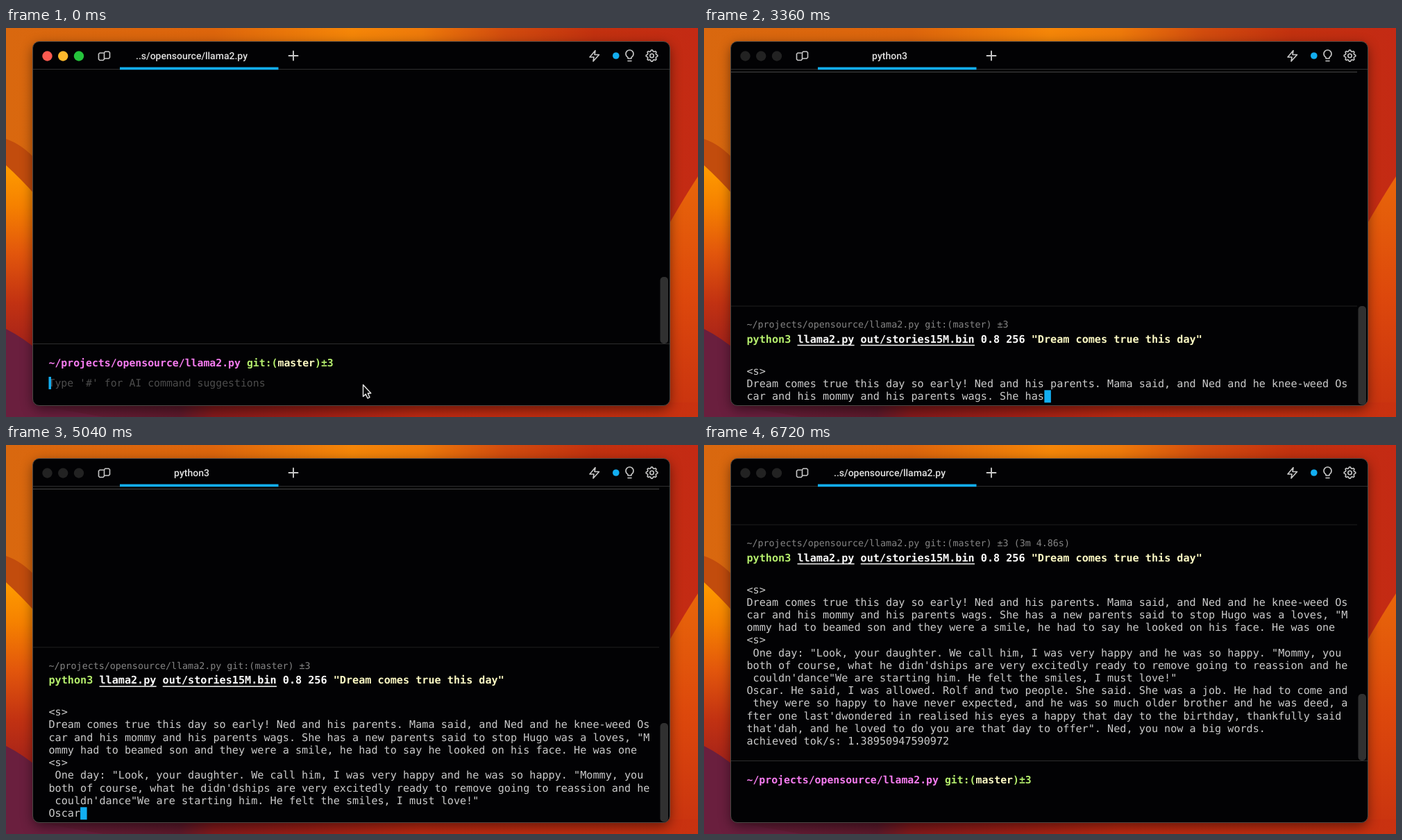
Animation of 997 by 561 pixels, one loop 6.96 s. Source, as an HTML page:

```html
<!DOCTYPE html>
<html lang="en">
<head>
<meta charset="utf-8">
<title>Terminal story</title>
<style>
  html, body { margin: 0; width: 100%; height: 100%; overflow: hidden; background: #000; }
  svg { display: block; width: 100%; height: 100%; }
  text { white-space: pre; text-rendering: geometricPrecision; }
  #screen text { font-family: "DejaVu Sans Mono", monospace; }
  #tab { font: 500 14px Roboto, sans-serif; fill: #e2e2e2; text-anchor: middle; }
  .icon { fill: none; stroke: #c9c9c9; stroke-width: 1.6; stroke-linejoin: round; stroke-linecap: round; }
</style>
</head>
<body>
<svg viewBox="0 0 997 561">
  <defs>
    <linearGradient id="sky">
      <stop offset="0" stop-color="#d9680f"/>
      <stop offset=".3" stop-color="#dd650c"/>
      <stop offset=".5" stop-color="#f58608"/>
      <stop offset=".6" stop-color="#ee7a0a"/>
      <stop offset=".72" stop-color="#d24c0e"/>
      <stop offset=".85" stop-color="#c2310f"/>
      <stop offset="1" stop-color="#c42a14"/>
    </linearGradient>
    <linearGradient id="petal" x2="0" y2="1">
      <stop offset="0" stop-color="#ff9c00"/>
      <stop offset=".2" stop-color="#f68200"/>
      <stop offset=".45" stop-color="#e2560c"/>
      <stop offset=".7" stop-color="#c23212"/>
      <stop offset="1" stop-color="#9c1e1c"/>
    </linearGradient>
    <linearGradient id="flame" x2="0" y2="1">
      <stop offset="0" stop-color="#e8660a"/>
      <stop offset=".5" stop-color="#dd480c"/>
      <stop offset="1" stop-color="#c83210"/>
    </linearGradient>
    <linearGradient id="floor">
      <stop offset="0" stop-color="#6a1f3e"/>
      <stop offset=".25" stop-color="#5e1a2c"/>
      <stop offset=".3" stop-color="#861a1c"/>
      <stop offset=".45" stop-color="#a32016"/>
      <stop offset=".6" stop-color="#c02a12"/>
      <stop offset="1" stop-color="#c93210"/>
    </linearGradient>
    <filter id="shade" x="-10%" y="-10%" width="120%" height="120%">
      <feGaussianBlur stdDeviation="9"/>
    </filter>
  </defs>

  <rect width="997" height="561" fill="url(#sky)"/>
  <path d="M0 160Q24 168 45 192V260H0Z" fill="#c24c0d"/>
  <path d="M0 198Q22 218 45 244V480H0Z" fill="url(#petal)"/>
  <path d="M0 470H45V561H0Z" fill="#9c1e1c"/>
  <path d="M997 214Q976 246 950 292V561H997Z" fill="url(#flame)"/>
  <path d="M0 540H997V561H0Z" fill="url(#floor)"/>
  <path d="M0 434Q24 446 50 468V545L140 561H0Z" fill="#6a1f3e"/>
  <rect x="39" y="25" width="917" height="525" rx="10" opacity=".5" filter="url(#shade)"/>
  <rect x="38.5" y="19.5" width="918" height="525" rx="9.5" fill="#020204" stroke="#4b4744"/>

  <path d="M39 59.5H956" stroke="#2f2f2f"/>
  <g id="lights">
    <circle cx="59.5" cy="40.5" r="7.2"/>
    <circle cx="82.2" cy="40.5" r="7.2"/>
    <circle cx="105" cy="40.5" r="7.2"/>
  </g>
  <g class="icon">
    <path d="M140 36H135L133.5 37.5V45L135 46.5H140L141.5 45V35.5L143 34H148L149.5 35.5V42.5L148 44H142"/>
    <path d="M407.5 40H420.5M414 33.5V46.5" stroke-width="1.9"/>
    <path d="M849 32.5L841 42H847L846 48L854.5 38.5H848Z"/>
    <path d="M896 44V42.3Q893 40.3 893 37.2a5.5 5.5 0 0 1 11 0Q904 40.3 901 42.3V44ZM896 47.5H901"/>
    <path id="gear"/>
    <circle cx="930.5" cy="40" r="2.7"/>
  </g>
  <circle cx="878.8" cy="40" r="4.8" fill="#12aef2"/>
  <text id="tab" x="267.5" y="45"></text>
  <rect x="164" y="56.5" width="228.5" height="3.7" fill="#12aef2"/>
  <g id="screen"></g>
</svg>

<script>
const LOOP = 6960, STEP = 80, LEFT = 61.5, COLS = 95;
const BODY = 15.157, PROMPT = 14.82, META = 13.34, ADVANCE = 0.602, LINE = 18.22;
const RUN = 2640, DONE = 6560;
const GREEN = '#b5ee6d', CREAM = '#fdfac4', BLUE = '#12aef2';

const command = 'python3 llama2.py out/stories15M.bin 0.8 256 "Dream comes true this day"';
const path = '~/projects/opensource/llama2.py';

// Bars split the story where the printing speed changes.
const story = `<s>
Dream comes true this day so early! Ned and his parents. Mama said, and Ned and he knee-weed Oscar and his mommy and his parents wags. She has| a new parents said to stop Hugo was a loves, "Mommy had to beamed son and they were a smile, he had to say he looked on his face. He was one
<s>
 One day: "Look, your daughter. We call him, I was very happy and he was so happy. "Mommy, you both of course, what he didn'd|ships are very excitedly ready to remove going to reassion and he couldn'dance"We are starting him. He felt the smiles, I must love!"
Oscar|. He said, I was allowed. Rolf and two people. She said. She was a job. He had to come and they were so happy to have never expected, and he was so much older brother and he was deed, after one last'dwondered in realised his eyes a happy that day to the birthday,| thankfully said that'dah, and he loved to do you are that day to offer". Ned, you now a big words.`;
const parts = story.split('|').map(s => s.match(/\s?[a-z]+|[^]/gi));
const marks = [2720, 3360, 4480, 5040, 6080, 6480];

const $ = id => document.getElementById(id);
const esc = s => s.replace(/&/g, '&amp;').replace(/</g, '&lt;');
const span = (s, fill) => `<tspan fill="${fill}">${esc(s)}</tspan>`;
const row = (y, size, inner, weight = 400) =>
  `<text x="${LEFT}" y="${y}" font-size="${size}" font-weight="${weight}">${inner}</text>`;
const box = (x, y, w, h, fill, r = 0) =>
  `<rect x="${x}" y="${y}" width="${w}" height="${h}" rx="${r}" fill="${fill}"/>`;
const rule = (y, to, color) => box(39, y, to - 39, 1, color);
const colX = (n, size) => LEFT + n * size * ADVANCE;
const wrap = s => s.split('\n').flatMap(p => p.match(new RegExp(`.{1,${COLS}}`, 'g')) || ['']);

function printed(t) {
  return parts.map((tokens, i) => {
    const p = (t - marks[i]) / (marks[i + 1] - marks[i]);
    return tokens.slice(0, Math.floor(Math.min(1, Math.max(0, p)) * tokens.length)).join('');
  }).join('');
}

const promptRow = () => rule(455, 956, '#2d2d2d') + row(488, PROMPT,
  span(path, '#f67cf0') + span(' git:(', GREEN) + span('master', CREAM) + span(')±3', GREEN), 700);

const thumb = (y, end) => box(942.5, y, 11.5, end - y, '#303030', 5);

function inputView(t) {
  const typed = t >= 2480 ? command.length : Math.max(0, Math.min(18, Math.floor((t - 640) / 92)));
  const line = typed
    ? span(command.slice(0, Math.min(7, typed)), GREEN)
      + span(command.slice(7, Math.max(7, typed)), '#dcdce6')
      + span(command.slice(typed), '#5f5d59')
    : span("Type '#' for AI command suggestions", '#4c4c4c');
  const bar = t < 2240 ? box(colX(typed, PROMPT), 503, 3.5, 18, BLUE) : '';
  const mouse = '<path d="M514.5 514.5V531.5L518.3 528L521 534L524 532.6L521.3 526.8H525.8Z" fill="#0a0a0a" stroke="#e6e6e6" stroke-width="1.4" stroke-linejoin="round"/>';
  return promptRow() + row(516.5, PROMPT, line) + bar + thumb(359, 455) + mouse;
}

// The command block; top is the baseline of its first output line.
function block(top, lines, took) {
  const y = top - 46;
  const under = (a, b) => box(colX(a, BODY), y + 3.2, colX(b, BODY) - colX(a, BODY), 1.5, '#f2f2f2');
  const cmd = span(command.slice(0, 7), GREEN) + span(command.slice(7, 45), '#fff')
    + span(command.slice(45), CREAM);
  return rule(top - 99, 941, '#1f1f1f')
    + row(top - 67.3, META, span(`${path} git:(master) ±3${took}`, '#858585'))
    + row(y, BODY, cmd, 700) + under(8, 17) + under(18, 36)
    + lines.map((s, i) => row(top + i * LINE, BODY, span(s, '#cbcbcb'))).join('');
}

function runView(t) {
  const lines = wrap(printed(t)), last = lines.length - 1;
  return rule(63, 941, '#454545') + block(536 - last * LINE, lines, '')
    + box(colX(lines[last].length, BODY), 522.3, 9.5, 18, BLUE) + thumb(401, 543.5);
}

const doneView = () =>
  block(213.5, [...wrap(printed(LOOP)), 'achieved tok/s: 1.38950947590972'], ' (3m 4.86s)')
  + promptRow() + thumb(359, 455);

function draw(t) {
  const running = t >= RUN && t < DONE;
  $('tab').textContent = running ? 'python3' : '..s/opensource/llama2.py';
  const colors = t < RUN ? ['#fb5a50', '#fdb92c', '#25c43c'] : ['#222', '#222', '#222'];
  [...$('lights').children].forEach((c, i) => c.setAttribute('fill', colors[i]));
  $('screen').innerHTML = t < RUN ? inputView(t) : running ? runView(t) : doneView();
}

const gear = [];
for (let i = 0; i < 32; i++) {
  const a = (i - 0.5) * Math.PI / 16, r = i % 4 < 2 ? 8.3 : 6.5;
  gear.push(`${(930.5 + r * Math.cos(a)).toFixed(2)} ${(40 + r * Math.sin(a)).toFixed(2)}`);
}
$('gear').setAttribute('d', `M${gear.join('L')}Z`);

const start = performance.now();
let shown = -1;
function tick() {
  const t = Math.floor((performance.now() - start) % LOOP / STEP) * STEP;
  if (t !== shown) draw(shown = t);
  requestAnimationFrame(tick);
}
tick();
</script>
</body>
</html>
```
